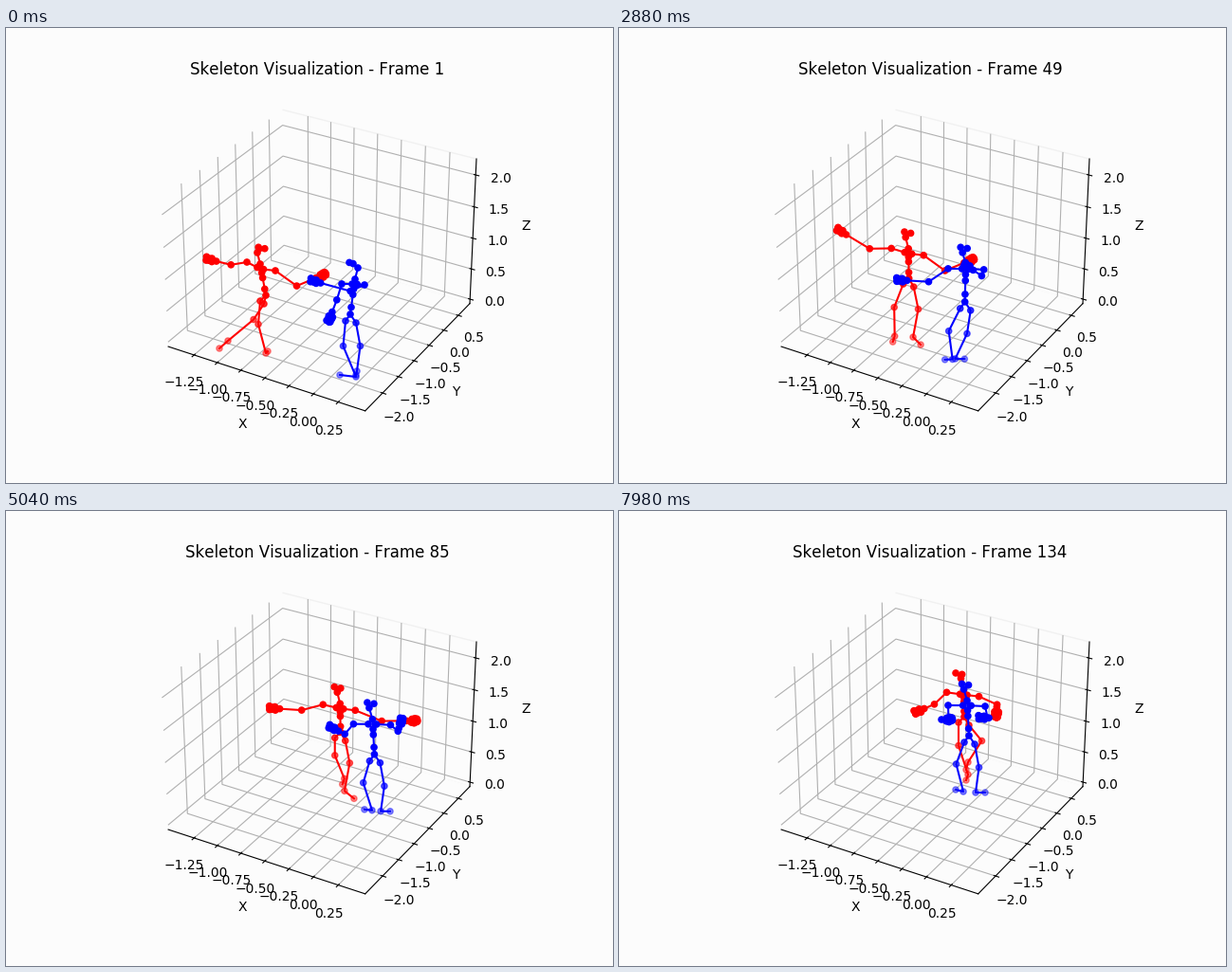
These frames come from a looping animation (640 px wide and 480 px high, 8 s). A matplotlib script:

```python
import numpy as np
import matplotlib.pyplot as plt
from matplotlib.animation import FuncAnimation
from matplotlib.collections import LineCollection

BG = "#fcfcfc"
STEP = 60      # ms per pose
TICK = 40      # ms per drawn frame
LOOP = 8000
LEG_ALPHA = [0.8, 0.65, 0.5, 0.45]

plt.rcParams["text.kerning_factor"] = 6
jitter = np.random.default_rng(4).uniform(-0.8, 0.8, (5, 3, 2))


def ease(n, a, b):
    s = np.clip((n - a) / (b - a), 0, 1)
    return s * s * (3 - 2 * s)


def hump(n, mid, width):
    return np.exp(-((n - mid) / width) ** 2)


def vec(x, y):
    return np.array([x, y], float)


def unit(v):
    return v / max(np.hypot(*v), 1e-6)


def arm(neck, shoulder, palm, share, sag):
    """Shoulder and palm are offsets from the neck; the elbow hangs between."""
    shoulder, palm = neck + shoulder, neck + palm
    elbow = shoulder + share * (palm - shoulder) + sag
    wrist = palm + 8 * unit(elbow - palm)
    return shoulder, elbow, wrist, palm


def leg(pelvis, hip, ankle, bend, toe):
    """Hip and ankle are offsets from the pelvis, the toe from the ankle."""
    knee = (hip + ankle) / 2 + bend
    return [pelvis + p for p in (hip, knee, ankle, ankle + toe)]


def red_pose(n):
    drop = ease(n, 116, 133)
    pelvis = vec(274 + 90 * ease(n, 10, 105), 282 - 65 * ease(n, 10, 120))
    neck = pelvis + vec(-6 + 5.5 * ease(n, 0, 45), -33 + 0.035 * n)
    head = neck + vec(-3, -12)
    look, gap = vec(4.5 - 0.05 * n, -5), vec(3.3, 0.7)

    palm_a = vec(-54 - 20 * ease(n, 0, 21) + 10 * hump(n, 70, 16)
                 - 9 * hump(n, 98, 12) + 25 * drop,
                 -2 - 27 * hump(n, 33, 22) + 7 * ease(n, 50, 84) + 18 * drop)
    palm_b = vec(66 + 12 * ease(n, 48, 84) - 44 * drop,
                 12 - 8 * hump(n, 21, 12) + 6 * ease(n, 48, 65)
                 + 17 * ease(n, 84, 116) - 9 * drop)
    arms = [arm(neck, vec(-14 - 4 * ease(n, 0, 48), -2 + 0.035 * n), palm_a,
                0.42, vec(0, 4 + 7 * hump(n, 58, 14))),
            arm(neck, vec(16, 7), palm_b,
                0.45, vec(11 * drop, 14 * (1 - ease(n, 48, 116))))]

    turn = ease(n, 21, 48)
    legs = [leg(pelvis, vec(-6, 6),
                vec(-15 * hump(n, 48, 12) + 4 * ease(n, 65, 84),
                    61 - 12 * hump(n, 84, 10)),
                vec(-5, -3), vec(2 - 4 * turn, -2 + 8 * turn)),
            leg(pelvis, vec(-2 + 7 * ease(n, 0, 21), 9),
                vec(-40 + 44 * ease(n, 0, 21) + 7 * hump(n, 65, 10),
                    48 + 14 * ease(n, 0, 45) - 14 * ease(n, 95, 133)),
                vec(5 + 16 * hump(n, 18, 14) + 9 * drop, -3),
                vec(-9 + 19 * ease(n, 0, 60) - 12 * ease(n, 84, 125), 8))]
    return pelvis, neck, head, look, gap, arms, legs


def blue_pose(n):
    turn, drop = ease(n, 21, 48), ease(n, 116, 133)
    reach, cross = ease(n, 0, 21), hump(n, 65, 9)
    pelvis = vec(363 + 26 * hump(n, 81, 20) + 6 * drop,
                 302 - 65 * ease(n, 18, 122))
    neck = pelvis + vec(5 - 7 * ease(n, 21, 70), -37 - 3 * hump(n, 48, 10))
    head = neck + vec(3 - 6.5 * turn, -12)
    look, gap = vec(-7 + 8.5 * turn, -5), vec(2 + 1.5 * turn, 0.6)

    palm_a = vec(-27 - 43 * reach + 27 * ease(n, 48, 84)
                 + 24 * ease(n, 84, 116),
                 42 - 25 * reach - 8 * ease(n, 48, 65) + 11 * drop)
    palm_b = vec(-44 + 74 * ease(n, 5, 80) + 19 * ease(n, 84, 116)
                 - 34 * drop,
                 2 - 8 * hump(n, 21, 10) + 21 * ease(n, 84, 116) - 5 * drop)
    arms = [arm(neck, vec(-14 - 6 * ease(n, 21, 60), 5), palm_a,
                0.4, vec(0, 2 + 7 * reach)),
            arm(neck, vec(10 + 9 * turn, 6), palm_b, 0.35, vec(4, 8))]

    legs = [leg(pelvis, vec(-5, 7),
                vec(6 - 20 * hump(n, 46, 9) - 22 * ease(n, 65, 110)
                    + 10 * drop, 66 - 7 * ease(n, 21, 60)),
                vec(-8, -3), vec(-17 + 9 * turn, -2 + 3 * hump(n, 60, 25))),
            leg(pelvis, vec(6, 9), vec(7 - 22 * hump(n, 55, 14), 60),
                vec(4 + 12 * cross, -1),
                vec(-1 + 11 * turn - 9 * cross, 4 - 4 * turn + 9 * cross))]
    return pelvis, neck, head, look, gap, arms, legs


def fingers(wrist, palm):
    along = unit(palm - wrist)
    side = vec(-along[1], along[0])
    reach = np.array([-2.8, 0, 2.8])
    return [palm + np.outer(reach, along) + 0.9 * (k - 2) * side + jitter[k]
            for k in range(5)]


class Skeleton:
    def __init__(self, ax, pose, rgb, z):
        self.pose, self.rgb = pose, rgb
        self.dots = ax.scatter([], [], s=20, zorder=z)
        self.bones = LineCollection([], colors=[rgb], linewidths=1.5,
                                    capstyle="projecting", zorder=z + 1)
        ax.add_collection(self.bones)

    def update(self, n):
        pelvis, neck, head, look, gap, arms, legs = self.pose(n)
        eyes = [head + look - gap, head + look + gap]
        spine = [pelvis + f * (neck - pelvis) for f in (0, 0.2, 0.56, 0.72)]
        dots = spine + [neck, head] + eyes
        bones = [np.array(spine + [neck, head]),
                 np.array([eyes[0], head, eyes[1]])]
        for shoulder, elbow, wrist, palm in arms:
            collar = neck + 0.22 * (shoulder - neck) + vec(0, 4)
            bones.append(np.array([spine[-1], collar, shoulder, elbow, wrist]))
            dots += [collar, shoulder, elbow, wrist]
            for finger in fingers(wrist, palm):
                bones.append(np.vstack([wrist, finger]))
                dots += list(finger)
        alpha = [1.0] * len(dots)
        for joints in legs:
            bones.append(np.vstack([pelvis, *joints]))
            dots += joints
            alpha += LEG_ALPHA
        colors = [(*self.rgb, a) for a in alpha]
        self.dots.set_offsets(dots)
        self.dots.set_facecolor(colors)
        self.dots.set_edgecolor(colors)
        self.bones.set_segments(bones)


fig = plt.figure(figsize=(6.4, 4.8), dpi=100, facecolor=BG)
ax = fig.add_subplot(111, projection="3d", facecolor=BG)
ax.set_xticks(np.arange(-1.25, 0.3, 0.25))
ax.set_yticks(np.arange(-2, 0.6, 0.5))
ax.set_zticks(np.arange(0, 2.1, 0.5))
ax.set_xlim(-1.531, 0.518)
ax.set_ylim(-2.53, 0.912)
ax.set_zlim(-0.074, 2.248)
ax.set_xlabel("X")
ax.set_ylabel("Y")
ax.set_zlabel("Z")
for axis in (ax.xaxis, ax.yaxis, ax.zaxis):
    axis.set_pane_color((0.988, 0.988, 0.988, 1))
ax.yaxis.pane.set_edgecolor("#f1f1f1")
title = ax.set_title("")

# Flat layer in stage pixels above the 3D box.
stage = fig.add_axes([0, 0, 1, 1], zorder=5)
stage.set_axis_off()
people = [Skeleton(stage, red_pose, (1, 0, 0), 2),
          Skeleton(stage, blue_pose, (0, 0, 1), 4)]
stage.set_xlim(0, 640)
stage.set_ylim(480, 0)


def draw(k):
    n = (k * TICK + TICK // 2) // STEP
    title.set_text(f"Skeleton Visualization - Frame {n + 1}")
    for person in people:
        person.update(n)
    return []


anim = FuncAnimation(fig, draw, frames=LOOP // TICK, interval=TICK,
                     init_func=lambda: draw(0), repeat=True, repeat_delay=0)
plt.show()
```
